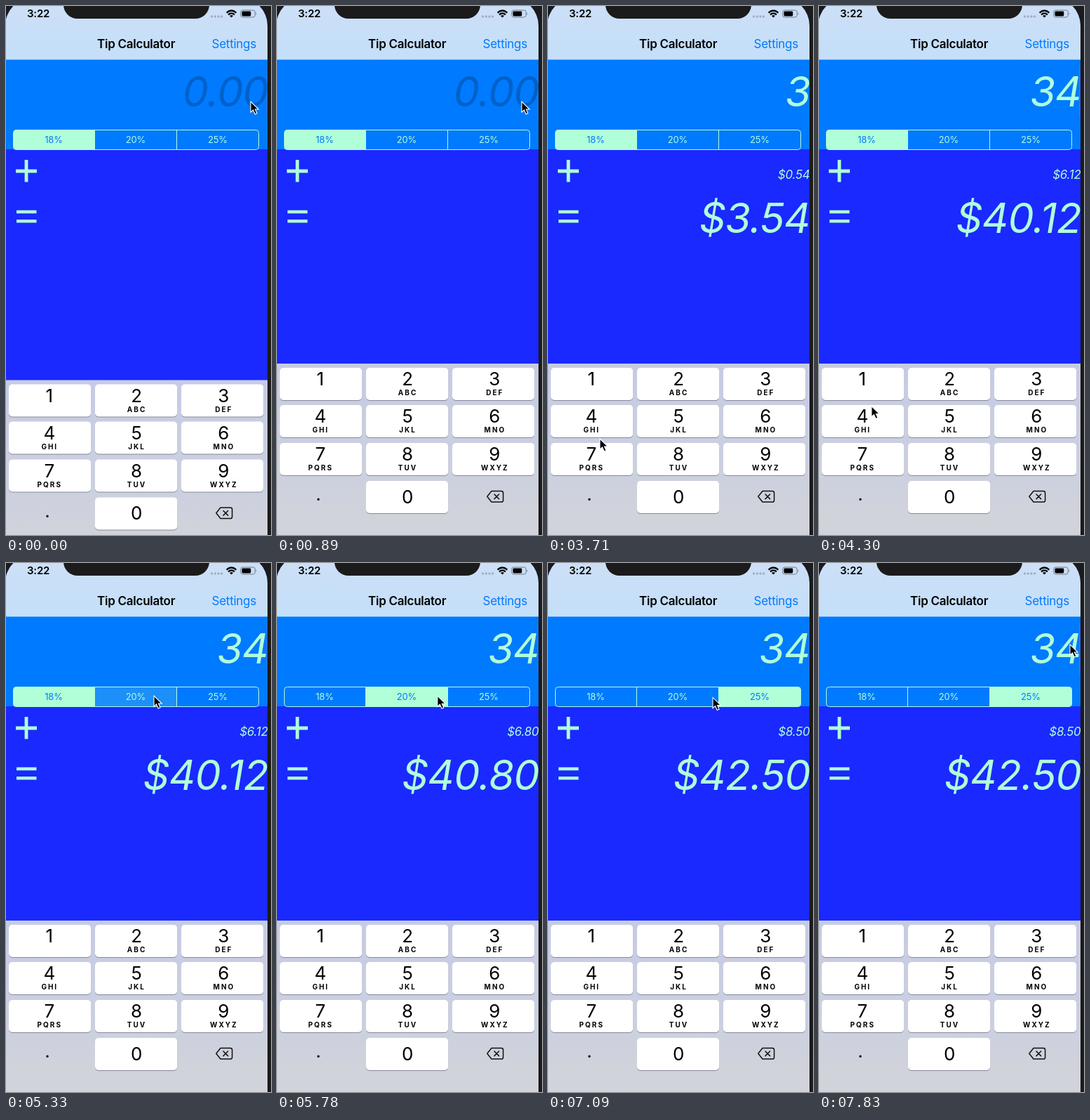
Write an HTML page that moves like this. It is 378x753 px and loops after 8000 ms.

```html
<!DOCTYPE html>
<html lang="en">
<head>
<meta charset="utf-8">
<title>Tip Calculator</title>
<style>
  html, body { margin: 0; width: 100%; height: 100%; overflow: hidden; background: #1b1b1b; }
  svg { display: block; width: 100vw; height: 100vh; font-family: Inter, Roboto, sans-serif; }
  .mid { text-anchor: middle; }
  .end { text-anchor: end; font-style: italic; fill: #b0ffd9; }
  .big { font-size: 59px; letter-spacing: -.8px; }
  .tip { font-size: 17px; letter-spacing: -.25px; }
  .bar { font-size: 17px; letter-spacing: -.25px; }
  .num { font-size: 26px; }
  .abc { font-size: 10px; font-weight: 700; letter-spacing: 2px; }
  .seg { font-size: 13px; letter-spacing: -.2px; }
</style>
</head>
<body>
<svg id="stage" viewBox="0 0 378 753">
  <defs>
    <clipPath id="screen"><rect x="-1" y="-12" width="374" height="900" rx="40"/></clipPath>
    <clipPath id="pill"><rect x="10.5" y="176.5" width="350" height="28" rx="4"/></clipPath>
    <linearGradient id="navFill" x2="0" y2="1">
      <stop stop-color="#ccdff6"/><stop offset="1" stop-color="#c4dffa"/>
    </linearGradient>
    <linearGradient id="padFill" x2="0" y2="1">
      <stop stop-color="#c6cbe4"/><stop offset=".55" stop-color="#cbd0e0"/>
      <stop offset=".8" stop-color="#d1d3da"/>
    </linearGradient>
  </defs>
  <rect width="378" height="753" fill="#1b1b1b"/>
  <g clip-path="url(#screen)">
    <rect width="373" height="753" fill="#1a29ff"/>
    <rect y="76" width="373" height="128" fill="#007aff"/>
    <rect width="373" height="76.4" fill="url(#navFill)"/>

    <text x="30" y="16.3" font-size="15" font-weight="600" letter-spacing="-.2">3:22</text>
    <g fill="#a0afc2">
      <circle cx="293.5" cy="15" r="1.7"/><circle cx="298.3" cy="15" r="1.7"/>
      <circle cx="303" cy="15" r="1.7"/><circle cx="307.6" cy="15" r="1.7"/>
    </g>
    <g fill="none" stroke="#000" stroke-width="2.2">
      <path d="M314.6 9.6Q321.5 3.4 328.4 9.6M317 12.4Q321.5 8.4 326 12.4"/>
      <path d="M319 14Q321.5 12 324 14L321.5 16.6Z" fill="#000" stroke="none"/>
    </g>
    <rect x="334.8" y="6" width="20.4" height="10" rx="2.8" fill="none" stroke="#6f7a88"/>
    <rect x="336.5" y="7.6" width="12.8" height="6.8" rx="1.4"/>
    <path d="M356.5 9.2Q358.4 11 356.5 12.8Z" fill="#6f7a88"/>

    <text class="bar mid" x="185.6" y="60" font-weight="600">Tip Calculator</text>
    <text class="bar" x="293.5" y="60" fill="#007aff">Settings</text>

    <rect id="caret" x="371" y="85" width="2" height="73" fill="#426bf2"/>
    <text id="amount" class="end big" x="374" y="143"></text>
    <g id="segments" clip-path="url(#pill)"></g>
    <path d="M126.5 176.5V204.5M243.5 176.5V204.5" stroke="#b0ffd9"/>
    <rect x="10.5" y="176.5" width="350" height="28" rx="4" fill="none" stroke="#b0ffd9"/>

    <path d="M14 235H44M29 219V250.5" stroke="#b0ffd9" stroke-width="4.8"/>
    <path d="M15 293H43.5M15 306.3H43.5" stroke="#b0ffd9" stroke-width="4.6"/>
    <text id="tip" class="end tip" x="373.5" y="245.5"></text>
    <text id="total" class="end big" x="374" y="322.5"></text>

    <g id="pad">
      <rect y="509" width="373" height="270" fill="url(#padFill)"/>
      <path d="M306 690.5H320Q322.6 690.5 322.6 693V703.4Q322.6 706 320 706H306L299.8 698.3Z
               M310 695L316.6 701.6M316.6 695L310 701.6"
            fill="none" stroke="#111" stroke-width="1.5" stroke-linejoin="round" stroke-linecap="round"/>
      <text class="num mid" x="59" y="704">.</text>
    </g>
  </g>
  <path d="M82 -2A20 20 0 0 0 102 18H270A20 20 0 0 0 290 -2Z" fill="#1b1b1b"/>
  <path id="mouse" d="M0 0V15.2L3.5 12L6.2 18L9 16.8L6.4 11H11.2Z" stroke="#fff" stroke-width="1.1"/>
</svg>
<script>
const LOOP = 8000, STEP = 148;
const $ = id => document.getElementById(id);
const clamp = v => Math.min(1, Math.max(0, v));
const ease = u => u * u * (3 - 2 * u);

function add(parent, tag, attrs, text = '') {
  const el = document.createElementNS('http://www.w3.org/2000/svg', tag);
  for (const k in attrs) el.setAttribute(k, attrs[k]);
  el.textContent = text;
  return parent.appendChild(el);
}

// Number pad
const letters = ['', 'ABC', 'DEF', 'GHI', 'JKL', 'MNO', 'PQRS', 'TUV', 'WXYZ'];
const keys = {};
function addKey(label, col, row, sub) {
  const y = Math.floor(515 + row * 53.7), mid = 61.8 + col * 124.3;
  const box = { x: 4 + col * 123, width: 117.2, height: 46, rx: 5 };
  add($('pad'), 'rect', { ...box, y: y + 1, fill: '#868a97' });
  keys[label] = add($('pad'), 'rect', { ...box, y, fill: '#fff' });
  add($('pad'), 'text', { class: 'num mid', x: mid, y: y + (sub === undefined ? 31.5 : 25.3) }, label);
  add($('pad'), 'text', { class: 'abc mid', x: mid + .5, y: y + 39.3 }, sub);
}
letters.forEach((sub, i) => addKey(i + 1, i % 3, Math.floor(i / 3), sub));
addKey(0, 1, 3);

// Tip rates
const rates = [18, 20, 25];
const segments = rates.map((rate, i) => {
  const x = 10 + i * 117;
  return {
    fill: add($('segments'), 'rect', { x, y: 176, width: 117, height: 29, fill: '#b0ffd9' }),
    text: add($('segments'), 'text', { class: 'seg mid', x: x + 58, y: 195.2 }, rate + '%')
  };
});

// Taps count time in steps; each takes effect on release
const taps = [
  { down: 20, up: 21, key: 3 },
  { down: 27, up: 28, key: 4 },
  { down: 35, up: 37, rate: 1 },
  { down: 43, up: 45, rate: 2 }
];

// Pointer stops: step, x, y
const stops = [
  [14, 349, 136], [18, 278, 477], [21, 266, 550], [22, 217, 564], [23, 108, 602],
  [25, 74, 616], [27, 64, 600], [28, 64, 600], [34, 211, 189], [37, 211, 189],
  [44, 301, 190], [46, 301, 190], [49, 212, 192], [53, 358, 116]
];

function pointer(n) {
  const i = stops.findIndex(s => s[0] > n);
  if (i === 0) return stops[0].slice(1);
  if (i < 0) return stops[stops.length - 1].slice(1);
  const [a, b] = [stops[i - 1], stops[i]];
  const u = ease((n - a[0]) / (b[0] - a[0]));
  return [1, 2].map(k => a[k] + (b[k] - a[k]) * u);
}

function draw(t) {
  const n = Math.floor((t + 14) / STEP);
  const held = taps.find(tap => n >= tap.down && n < tap.up) || {};
  let amount = '', choice = 0;
  for (const { up, key, rate } of taps) {
    if (n < up) break;
    if (key) amount += key;
    else choice = rate;
  }
  const tip = amount * rates[choice] / 100;
  const money = v => amount ? '$' + v.toFixed(2) : '';

  $('amount').textContent = amount || '0.00';
  $('amount').style.fill = amount ? '' : '#0061c9';
  $('tip').textContent = money(tip);
  $('total').textContent = money(+amount + tip);
  segments.forEach((s, i) => {
    s.fill.setAttribute('opacity', i === choice ? 1 : i === held.rate ? .16 : 0);
    s.text.setAttribute('fill', i === choice ? '#007aff' : '#b0ffd9');
  });
  for (const k in keys) keys[k].setAttribute('fill', +k === held.key ? '#b5bac8' : '#fff');
  $('pad').setAttribute('transform', `translate(0 ${23.5 * clamp(1 - n / 3) ** 2})`);
  $('caret').setAttribute('opacity', clamp(.5 + Math.sin((n - 9) * Math.PI / 3)));
  $('mouse').setAttribute('transform', `translate(${pointer(n)})`);
}

const start = performance.now();
function tick(now) {
  draw(Math.max(0, now - start) % LOOP);
  requestAnimationFrame(tick);
}
draw(0);
requestAnimationFrame(tick);
</script>
</body>
</html>
```
